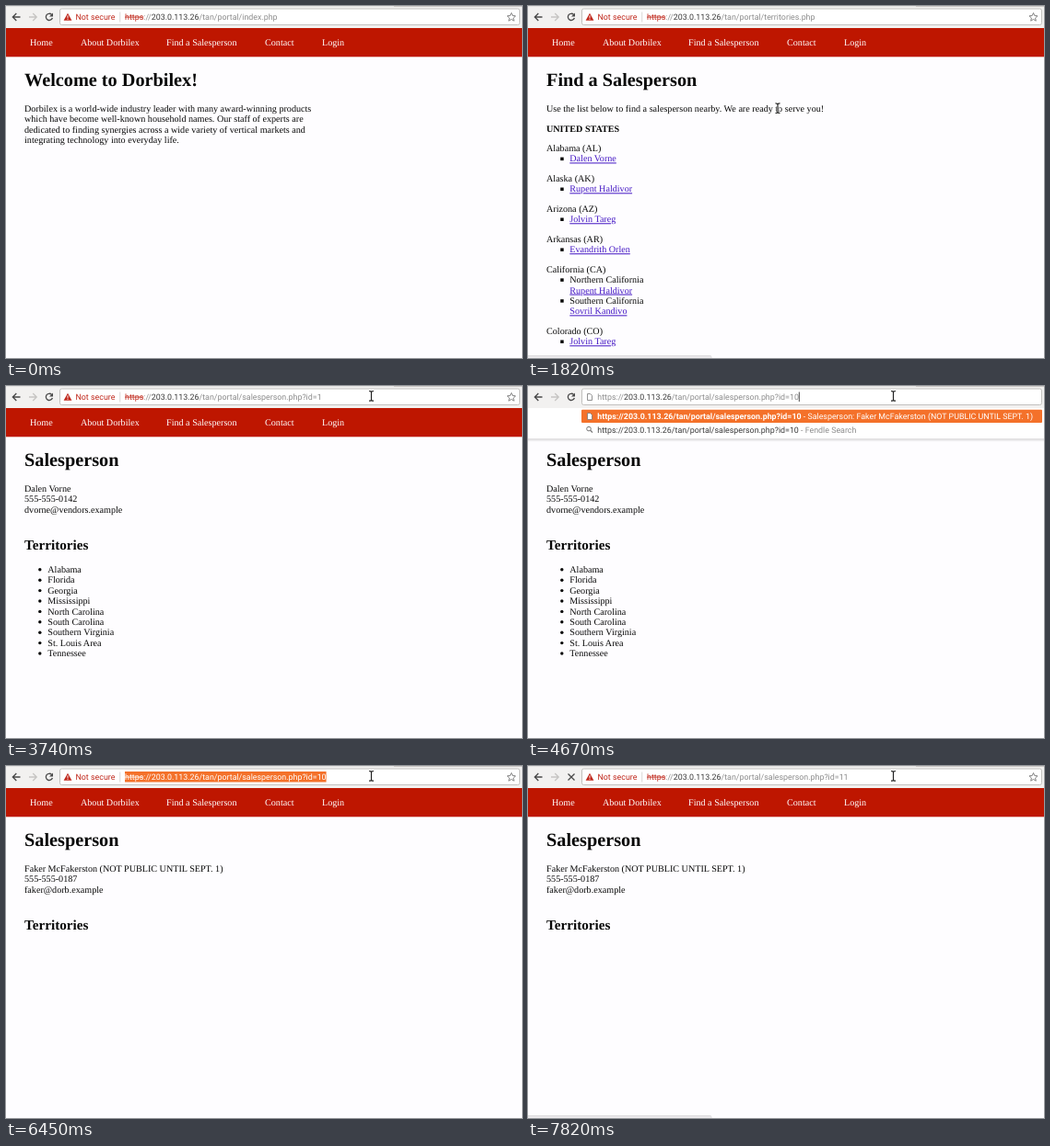
These frames come from a looping animation (560 px wide and 383 px high, 8000 ms). An HTML page:

```html
<!DOCTYPE html>
<html lang="en">
<head>
<meta charset="utf-8">
<title>Salesperson lookup</title>
<style>
  html, body { margin: 0; height: 100%; overflow: hidden; background: #fefdff; }
  svg { display: block; width: 100vw; height: 100vh; }
  text { white-space: pre; text-rendering: geometricPrecision; }
  .page { font: 10.14px "Liberation Serif", "Times New Roman", serif; fill: #080808; }
  .page .h1 { font-size: 20.28px; font-weight: bold; }
  .page .h2 { font-size: 15.2px; font-weight: bold; }
  .page .b { font-weight: bold; }
  .page .link { fill: #4417c4; text-decoration: underline; }
  .page .nav { fill: #fff; }
  .ui { font: 8.87px Roboto, "Open Sans", sans-serif; fill: #3a3a3a; }
  .ui .dim { fill: #8c8c8c; }
  .ui .red { fill: #c0281c; }
  .ui .green { fill: #1a6b45; }
  .ui .bold { font-weight: bold; }
  .ui .white, .ui .white tspan { fill: #fff; }
  .line { fill: none; stroke: #484848; stroke-width: 1.3; }
</style>
</head>
<body>
<svg viewBox="0 0 560 383" preserveAspectRatio="none">
  <g id="scene"></g>
  <g id="status"><path d="M0 380H197.500Q199.500 380 199.500 383H0Z" fill="#dfdde0"/><path d="M0 381.500H198.500V383H0Z" fill="#efedf0"/></g>
  <g id="cursor"></g>
</svg>
<script>
const LOOP = 8000, LINE = 11.4;
const ORANGE = '#f4712a';
const HOST = '203.0.113.26', DIR = '/tan/portal/';
const FIRM = 'Dorbilex', SELLER = 'Dalen Vorne', TRIAL = 'Faker McFakerston (NOT PUBLIC UNTIL SEPT. 1)';
const byId = name => document.getElementById(name);

const pen = document.createElement('canvas').getContext('2d');
const width = s => { pen.font = '8.87px Roboto, "Open Sans", sans-serif'; return pen.measureText(s).width; };
const text = (x, y, s, cls = '') => `<text x="${x}" y="${y}" class="${cls}">${s}</text>`;
const span = (cls, s) => `<tspan class="${cls}">${s}</tspan>`;
const rect = (x, y, w, h, fill, more = '') =>
  `<rect x="${x}" y="${y}" width="${w}" height="${h}" fill="${fill}" ${more}/>`;
const line = (d, more = '') => `<path class="line" d="${d}" ${more}/>`;
const lines = (x, y, list, cls) => list.map((s, i) => text(x, y + i * LINE, s, cls)).join('');

// ---- web pages ----
const nav = rect(0, 24, 560, 31.3, '#be1600') +
  [[26, 'Home'], [81, 'About ' + FIRM], [174, 'Find a Salesperson'], [281, 'Contact'], [343, 'Login']]
    .map(([x, s]) => text(x, 43.4, s, 'nav')).join('');
const page = (title, body) => `<g class="page">${nav}${text(20, 87.3, title, 'h1')}${body}</g>`;
const square = y => rect(35.2, y - 4.8, 3.5, 3.5, '#080808');

function territoryList() {
  const groups = [
    ['Alabama (AL)', SELLER], ['Alaska (AK)', 'Rupent Haldivor'], ['Arizona (AZ)', 'Jolvin Tareg'],
    ['Arkansas (AR)', 'Evandrith Orlen'],
    ['California (CA)', 'Northern California:Rupent Haldivor', 'Southern California:Sovril Kandivo'],
    ['Colorado (CO)', 'Jolvin Tareg']];
  let y = 158, out = '';
  for (const [state, ...items] of groups) {
    out += text(20, y, state);
    for (const item of items) {
      const [name, area] = item.split(':').reverse();
      y += LINE;
      out += square(y);
      if (area) { out += text(45.3, y, area); y += LINE; }
      out += text(45.3, y, name, 'link');
    }
    y += LINE + 10.14;
  }
  return out;
}

const person = (info, areas) => page('Salesperson',
  lines(20, 115, info) + text(20, 177.6, 'Territories', 'h2') + lines(45.3, 203, areas) +
  areas.map((_, i) => `<circle cx="36.800" cy="${199.8 + i * LINE}" r="1.700"/>`).join(''));

const home = page(`Welcome to ${FIRM}!`, lines(20, 115, [
  FIRM + ' is a world-wide industry leader with many award-winning products',
  'which have become well-known household names. Our staff of experts are',
  'dedicated to finding synergies across a wide variety of vertical markets and',
  'integrating technology into everyday life.']));
const list = page('Find a Salesperson',
  text(20, 115, 'Use the list below to find a salesperson nearby. We are ready to serve you!') +
  text(20, 136.5, 'UNITED STATES', 'b') + territoryList());
const seller = person([SELLER, '555-555-0142', 'dvorne@vendors.example'],
  ['Alabama', 'Florida', 'Georgia', 'Mississippi', 'North Carolina', 'South Carolina',
   'Southern Virginia', 'St. Louis Area', 'Tennessee']);
const trial = person([TRIAL, '555-555-0187', 'faker@dorb.example'], []);

// ---- browser toolbar ----
const byNumber = n => 'salesperson.php?id=' + n;
const fullUrl = file => 'https://' + HOST + DIR + file;
const sheet = y => `<path d="M64.500 ${y - 3.5}h3l2 2v5h-5z" fill="#fff" stroke="#777" stroke-width=".8"/>`;
const lens = y => `<circle cx="66" cy="${y - 0.8}" r="2.300" fill="none" stroke="#777"/>` +
  `<path d="M67.700 ${y + 0.9}l2.300 2.300" stroke="#777" stroke-width="1.300"/>`;
const caret = x => rect(x, 6.5, 0.8, 10.5, '#222');

const toolbar = (busy, content) => `<g class="ui">${rect(0, 0, 560, 24, '#f2f1f0')}
  ${rect(0, 0, 421, 0.6, '#dddbd9')}${rect(421, 0, 139, 1, '#c9c6c4')}
  ${rect(58.5, 3, 499, 17.5, '#fff', 'rx="2" stroke="#c2c0be"')}
  ${line('M15.500 12H7.500M11.300 8L7.300 12L11.300 16')}
  ${line('M25 12h8M29.200 8l4 4l-4 4', 'style="stroke:#c6c4c2"')}
  ${busy ? line('M43.500 8.500l7 7M50.500 8.500l-7 7')
         : line('M49.600 9.400A3.600 3.600 0 1 0 50.400 13') + '<path d="M51 7.500v4h-4z" fill="#484848"/>'}
  ${content}</g>`;

function shown(file, { busy, selected, atEnd } = {}) {
  const x = 129, end = x + width(fullUrl(file));
  const url = span('red', 'https') + span('dim', '://') + HOST + span('dim', DIR + file);
  return toolbar(busy,
    '<path d="M67 7.700l4.400 8h-8.800z" fill="#c0281c"/><path d="M67 10.300v2.600M67 13.600v1.200" stroke="#fff"/>' +
    text(75.5, 14.9, 'Not secure', 'red') + rect(123.4, 6.5, 0.8, 11, '#d0cecc') +
    (selected ? rect(x, 6, end - x, 11.5, ORANGE) : '') +
    text(x, 14.9, url, selected ? 'white' : '') +
    rect(x, 11.7, width('https'), 0.8, selected ? '#fff' : '#c0281c') +
    (atEnd ? caret(end) : '') +
    '<path d="M548.500 7.500l1.300 3 3.200.300-2.400 2.200.700 3.200-2.800-1.700-2.800 1.700.700-3.200-2.400-2.200 3.200-.300z" fill="none" stroke="#777" stroke-width=".9"/>');
}

// Address field while typing; `marked` is the highlighted tail of the entry.
function edit(n, marked, rows) {
  const x = 75.3, typed = x + width(fullUrl(byNumber(n)));
  const height = 4.5 + rows.length * 14.4;
  const shade = [0.16, 0.09, 0.04].map((a, i) => rect(0, 24 + height + i, 560, 1, '#000', `opacity="${a}"`)).join('');
  const menu = rect(0, 24, 560, height, '#fff') + shade + rows.map(([kind, head, tail], i) => {
    const y = 33 + i * 14.4, first = i === 0;
    return (first ? rect(58, y - 7.3, 500, 14.3, ORANGE, 'rx="1"') : '') +
      (kind === 'search' ? lens(y) : sheet(y)) +
      text(x, y + 3.2, (kind === 'search' ? head : span('bold green', head)) +
        span('dim', ' - ') + span(kind === 'search' ? 'dim' : '', tail), first ? 'white' : '');
  }).join('');
  return toolbar(false, sheet(12) +
    (marked ? rect(typed, 6, width(marked), 11.5, ORANGE) : '') +
    text(x, 14.9, span('dim', 'https://') + HOST + span('dim', DIR + byNumber(n)) + span('white', marked)) +
    (marked ? '' : caret(typed)) + menu);
}
const visit = (n, who) => ['page', fullUrl(byNumber(n)), 'Salesperson: ' + who];
const search = n => ['search', fullUrl(byNumber(n)), 'Fendle Search'];
const idler = visit(11, 'Idle Loafton (FIRED FOR STEALING)');

// ---- timeline ----
let scenes = [];
const buildScenes = () => scenes = [
  [0, home, shown('index.php')],
  [1340, home, shown('territories.php', { busy: true })],
  [1760, list, shown('territories.php')],
  [3010, list, shown(byNumber(1), { busy: true })],
  [3320, seller, shown(byNumber(1))],
  [3870, seller, shown(byNumber(1), { selected: true })],
  [4470, seller, shown(byNumber(1), { atEnd: true })],
  [4670, seller, edit(10, '', [visit(10, TRIAL), search(10)])],
  [4990, seller, shown(byNumber(10), { busy: true })],
  [5620, trial, shown(byNumber(10))],
  [6450, trial, shown(byNumber(10), { selected: true })],
  [6570, trial, shown(byNumber(10), { atEnd: true })],
  [7100, trial, edit(1, '0', [visit(10, TRIAL), idler, search(1), visit(1, SELLER)])],
  [7280, trial, edit(11, '', [idler, search(11)])],
  [7460, trial, shown(byNumber(11), { busy: true })]];

const path = [[660, 447, 154], [920, 447, 154], [1280, 222, 38], [1400, 222, 38],
  [1820, 271, 111], [1880, 271, 111], [2560, 92.5, 163], [3260, 92.5, 163], [3740, 396.5, 10.7], [LOOP, 396.5, 10.7]];
const kinds = [[0, 'none'], [660, 'arrow'], [1220, 'hand'], [1600, 'beam'], [2100, 'arrow'],
  [2690, 'hand'], [3010, 'arrow'], [3680, 'beam']];
const beam = 'M-2.500 -5.200Q0 -5.200 0 -3.800Q0 -5.200 2.500 -5.200M0 -4V4.500M-2.500 5.500Q0 5.500 0 4.200Q0 5.500 2.500 5.500';
const shapes = {
  none: '',
  arrow: '<path d="M0 0V10.500L2.500 8.200L4.300 12.300L6.200 11.500L4.400 7.500H7.700Z" fill="#fff" stroke="#222" stroke-width=".9"/>',
  hand: '<path d="M-1 0.500Q0 -.800 1 .500V4.500L5.500 5.600Q6.500 6 6.200 8L5.200 11.500H-.500L-3.700 7.200Q-3.500 5.800 -1 7.500Z" fill="#fff" stroke="#222" stroke-width=".9"/>',
  beam: `<path d="${beam}" fill="none" stroke="#fff" stroke-width="2.600"/><path d="${beam}" fill="none" stroke="#222" stroke-width="1.200"/>`
};
const loads = [[1400, 1850], [2690, 3400], [5050, 5650], [7520, 9000]];

const latest = (steps, t) => steps.findLastIndex(s => s[0] <= t);
const clamp = v => Math.max(0, Math.min(1, v));

function place(t) {
  const i = Math.max(0, latest(path, t));
  const [t0, x0, y0] = path[i], [t1, x1, y1] = path[i + 1];
  const p = clamp((t - t0) / (t1 - t0)), e = p * p * (3 - 2 * p);
  return [x0 + (x1 - x0) * e, y0 + (y1 - y0) * e];
}

let sceneAt = -1, kindAt = -1;
function draw() {
  const t = performance.now() % LOOP;
  const s = latest(scenes, t), k = latest(kinds, t);
  if (s !== sceneAt) byId('scene').innerHTML = scenes[sceneAt = s][1] + scenes[s][2];
  if (k !== kindAt) byId('cursor').innerHTML = shapes[kinds[kindAt = k][1]];
  byId('cursor').setAttribute('transform', `translate(${place(t)})`);
  byId('status').setAttribute('opacity',
    Math.max(...loads.map(([a, b]) => Math.min(clamp((t - a) / 80), clamp(1 - (t - b) / 300)))));
  requestAnimationFrame(draw);
}
buildScenes();
draw();
</script>
</body>
</html>
```
